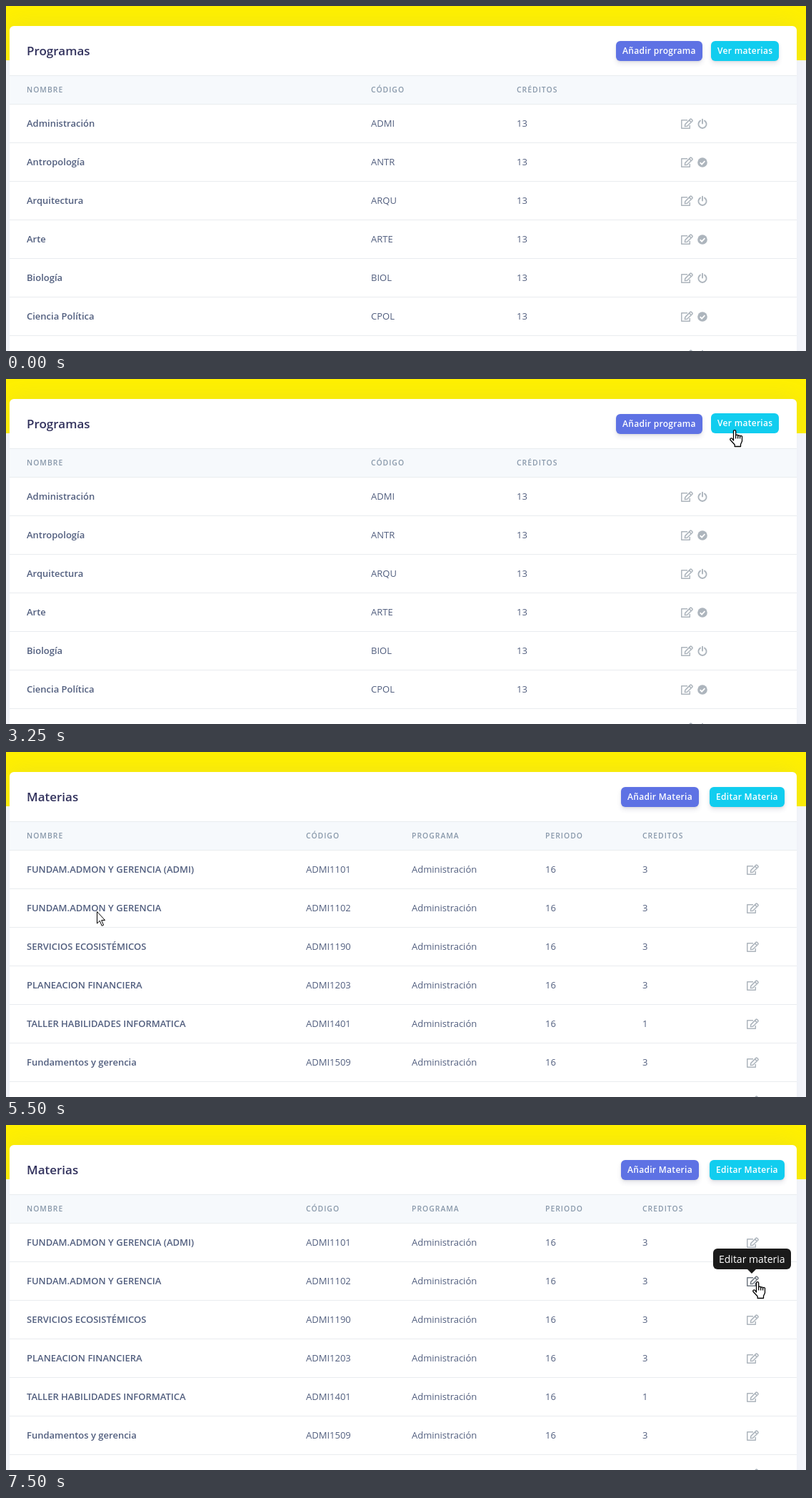
These frames come from a looping animation (1120x483 px, 8000 ms). An HTML page:

```html
<!DOCTYPE html>
<html lang="es">
<head>
<meta charset="utf-8">
<title>Programas y materias</title>
<style>
  html, body { margin: 0; width: 100%; height: 100%; overflow: hidden; }
  body {
    position: relative;
    background: linear-gradient(#fff000 76px, #f8f9fe 76px);
    font: 13px/53px "Open Sans", sans-serif;
    color: #525f7f;
  }
  .card, .view, .view *, .cursor { position: absolute; white-space: nowrap; }
  .view svg *, .cursor * { position: static; }
  .card {
    left: 5px; top: 28px; width: 1102px; height: 480px;
    border-radius: 6px; background: #fff;
    box-shadow: 0 0 32px rgba(136, 152, 170, .15);
  }
  .view { inset: 0; }
  h3 { left: 29px; top: 28px; margin: 0; font-size: 17px; line-height: 69px; font-weight: 600; color: #32325d; }
  .head, .row { left: 5px; width: 1102px; border-bottom: 1px solid #e9ecef; }
  .head {
    top: 97px; height: 39px; border-top: 1px solid #e9ecef; background: #f6f9fc;
    font-size: 10.4px; line-height: 39px; font-weight: 600;
    letter-spacing: 1px; text-transform: uppercase; color: #8898aa;
  }
  .row { height: 53px; }
  .row span:first-child { font-weight: 600; }
  .row svg { top: 19px; color: #adb5bd; }

  .button {
    top: 49px; padding: 5px 9px; border-radius: 6px;
    font-size: 12px; line-height: 18px; font-weight: 600; letter-spacing: .025em;
    color: #fff; background: #5e72e4;
    box-shadow: 0 4px 6px rgba(50, 50, 93, .11), 0 1px 3px rgba(0, 0, 0, .08);
  }
  .button.info { background: #11cdef; }

  .tooltip {
    left: 990px; top: 173px; padding: 4px 8px; border-radius: 6px;
    font-size: 14px; line-height: 21px; color: #fff; background: #1a1a1a;
  }
  .tooltip::after {
    content: ""; position: absolute; left: 50%; top: 100%; margin-left: -6.4px;
    border: 6.4px solid transparent; border-top-color: #1a1a1a; border-bottom: 0;
  }
  .cursor { left: 0; top: 0; overflow: visible; fill: #fff; stroke: #000; }

  #programs, #loading, #subjects, .tooltip, #programs .info, .cursor, #subjects .hovered {
    animation: 8s step-end infinite;
  }
  #programs { animation-name: programs; }
  #loading { animation-name: loading; }
  #subjects { animation-name: subjects; }
  .tooltip { animation-name: tooltip; }
  #programs .info { animation-name: press; }
  #subjects .hovered { animation-name: darken; }
  #arrow { animation-name: arrow; }
  #hand { animation-name: hand; }

  @keyframes programs { 0% { visibility: visible } 53.125%, 100% { visibility: hidden } }
  @keyframes loading { 0%, 59.375%, 100% { visibility: hidden } 53.125% { visibility: visible } }
  @keyframes subjects { 0% { visibility: hidden } 59.375%, 100% { visibility: visible } }
  @keyframes tooltip { 0% { opacity: 0 } 93.75%, 100% { opacity: 1 } }
  @keyframes darken { 0% { color: #adb5bd } 93.75%, 100% { color: #727a83 } }
  @keyframes press {
    31.25% { transform: translateY(-1px); box-shadow: 0 7px 14px rgba(50, 50, 93, .1), 0 3px 6px rgba(0, 0, 0, .08); }
    37.5% { transform: translateY(-1px); box-shadow: 0 3px 6px rgba(50, 50, 93, .06); }
    40.625%, 100% { transform: translateY(-1px); box-shadow: none; }
  }
  @keyframes arrow {
    0%, 31.25%, 93.75%, 100% { transform: translate(-99px, 0) }
    9.375% { transform: translate(605px, 457px) }
    12.5% { transform: translate(664px, 407px) }
    15.625% { transform: translate(793px, 324px) }
    18.75% { transform: translate(858px, 276px) }
    21.875% { transform: translate(1008px, 170px) }
    25% { transform: translate(1022px, 112px) }
    28.125% { transform: translate(1020px, 63px) }
    59.375% { transform: translate(987px, 114px) }
    62.5% { transform: translate(639px, 154px) }
    65.625% { transform: translate(392px, 220px) }
    68.75% { transform: translate(127px, 223px) }
    71.875% { transform: translate(197px, 223px) }
    75% { transform: translate(348px, 234px) }
    78.125% { transform: translate(527px, 230px) }
    81.25% { transform: translate(672px, 232px) }
    84.375% { transform: translate(919px, 232px) }
    87.5% { transform: translate(1011px, 229px) }
    90.625% { transform: translate(1068px, 230px) }
  }
  @keyframes hand {
    0%, 59.375% { transform: translate(-99px, 0) }
    31.25% { transform: translate(1013px, 71px) }
    93.75%, 100% { transform: translate(1045px, 219px) }
  }
</style>
</head>
<body>
<div class="card"></div>
<div class="view" id="programs"></div>
<div class="view" id="loading"></div>
<div class="view" id="subjects"></div>

<svg class="cursor" id="arrow" width="12" height="21">
  <path d="M.5.5V17L4.3 13.3 7.2 20.3 9.6 19.3 6.7 12.5H11.6z"/>
</svg>
<svg class="cursor" id="hand" width="18" height="24" stroke-width="1.3" stroke-linejoin="round">
  <path d="M5.5 15V2.2a1.6 1.6 0 0 1 3.2 0V8.5a1.5 1.5 0 0 1 3 .4 1.5 1.5 0 0 1 2.9.6 1.5 1.5 0 0 1 2.9 1V16l-2 4.5v3H7.2V21L1 14.2a1.6 1.6 0 0 1 2.4-2z"/>
  <path d="M8.7 8.5v4M11.7 9v3.5M14.6 9.5v3"/>
</svg>

<script>
  const ICONS = {
    edit: `<g fill="none" stroke="currentColor" stroke-width="1.5" stroke-linejoin="round">
      <path d="M9 2.7H.8V14.2H12.3V9.9"/>
      <path d="M5.4 11.6 5.8 8.6 13 1.4q.7-.7 1.4 0l1.4 1.4q.7.7 0 1.4L8.6 11.3zM11.5 2.9l2.8 2.8"/></g>`,
    power: `<path d="M4 3.6a5.6 5.6 0 1 0 6 0M7 1.6V7.6" fill="none"
      stroke="currentColor" stroke-width="1.9" stroke-linecap="round"/>`,
    check: `<circle cx="7" cy="8" r="6.8" fill="currentColor"/>
      <path d="M3.7 8.2l2.4 2.4 4.3-4.4" fill="none" stroke="#fff" stroke-width="1.8"/>`
  };
  const CARD_LEFT = 5;

  const icon = (name, x, cls = "") =>
    `<svg class="${cls}" style="left:${x - CARD_LEFT}px" width="17" height="16">${ICONS[name]}</svg>`;

  const cells = (texts, xs) =>
    texts.map((text, i) => `<span style="left:${xs[i] - CARD_LEFT}px">${text}</span>`).join("");

  const button = (text, x, cls = "") =>
    `<div class="button ${cls}" style="left:${x}px">${text}</div>`;

  function fillView(id, { title, buttons, heads, xs, rows, icons }) {
    const body = rows.map((row, i) =>
      `<div class="row" style="top:${138 + 54 * i}px">${cells(row, xs)}${icons(i)}</div>`);
    document.getElementById(id).innerHTML =
      `<h3>${title}</h3>${buttons}<div class="head">${cells(heads, xs)}</div>${body.join("")}`;
  }

  fillView("programs", {
    title: "Programas",
    buttons: button("Añadir programa", 854) + button("Ver materias", 987, "info"),
    heads: ["Nombre", "Código", "Créditos"],
    xs: [29, 511, 715],
    rows: [
      ["Administración", "ADMI", 13], ["Antropología", "ANTR", 13],
      ["Arquitectura", "ARQU", 13], ["Arte", "ARTE", 13],
      ["Biología", "BIOL", 13], ["Ciencia Política", "CPOL", 13], []
    ],
    icons: i => icon("edit", 944.5) + icon(i % 2 ? "check" : "power", 968)
  });

  const subjects = {
    title: "Materias",
    buttons: button("Añadir Materia", 861) + button("Editar Materia", 985, "info"),
    heads: ["Nombre", "Código", "Programa", "Periodo", "Creditos"],
    rows: [
      ["FUNDAM.ADMON Y GERENCIA (ADMI)", 1101, 3], ["FUNDAM.ADMON Y GERENCIA", 1102, 3],
      ["SERVICIOS ECOSISTÉMICOS", 1190, 3], ["PLANEACION FINANCIERA", 1203, 3],
      ["TALLER HABILIDADES INFORMATICA", 1401, 1], ["Fundamentos y gerencia", 1509, 3]
    ].map(([name, code, credits]) => [name, "ADMI" + code, "Administración", 16, credits]).concat([[]])
  };
  fillView("loading", { ...subjects, xs: [29, 423, 572, 760, 897], icons: () => "" });
  fillView("subjects", {
    ...subjects,
    xs: [29, 420, 568, 755, 891],
    icons: i => icon("edit", 1036.5, i === 1 ? "hovered" : "")
  });
  document.getElementById("subjects")
    .insertAdjacentHTML("beforeend", '<div class="tooltip">Editar materia</div>');
</script>
</body>
</html>
```
